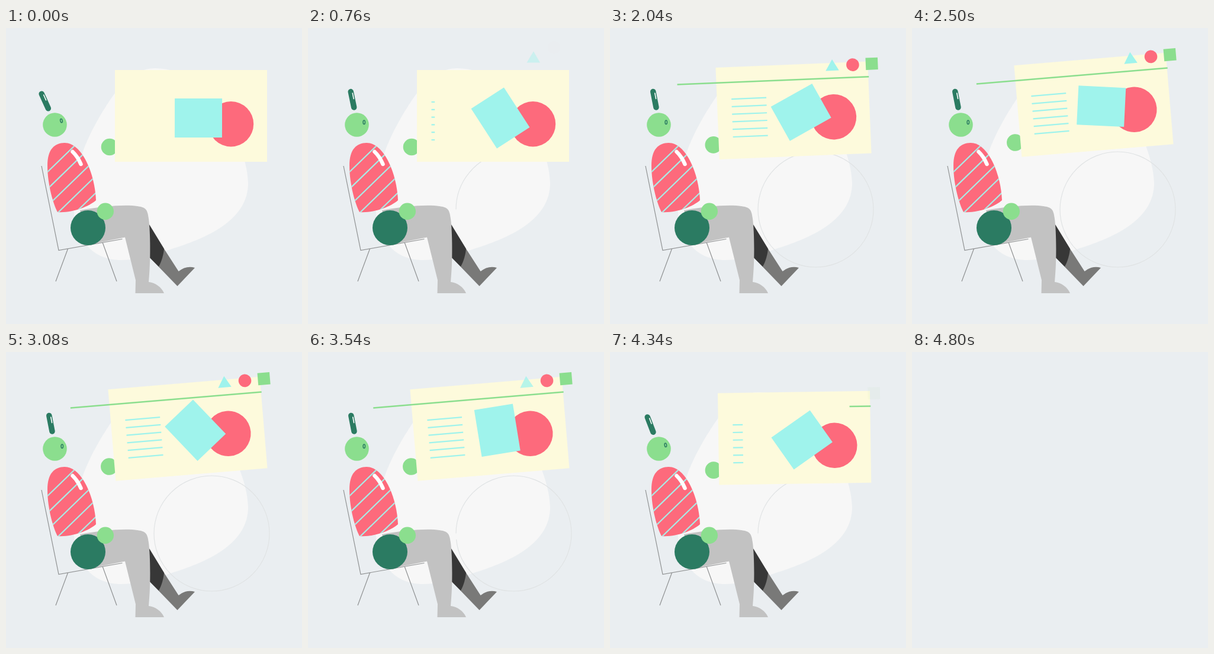
Animation of 500 by 500 pixels, one loop 4.82 s. Source, as an HTML page:

```html
<!DOCTYPE html>
<html lang="en">
<head>
<meta charset="utf-8">
<title>Presenter</title>
<style>
  html, body { margin: 0; height: 100%; overflow: hidden; background: #eaeef1; }
  svg { display: block; width: 100vw; height: 100vh; }
  .leaf { fill: #8bde8e; }
  .pine { fill: #2b7b62; }
  .rose { fill: #fd6a7c; }
  .aqua { fill: #9ff3ec; }
  .line { fill: none; stroke-linecap: butt; }
  .round { fill: none; stroke-linecap: round; }
</style>
</head>
<body>
<svg id="scene" viewBox="0 0 500 500">
  <defs>
    <clipPath id="torso">
      <path d="M87 311C80 298 70 265 70 232C70 205 82 194 99 194C128 194 150 245 152 291C140 302 110 313 87 311Z"/>
    </clipPath>
  </defs>

  <path fill="#f7f7f7" d="M252 68C205 68 178 118 158 150C136 188 112 240 114 300C116 350 140 392 195 392C240 391 262 378 290 370C345 352 409 322 409 262C409 205 350 68 252 68Z"/>
  <path id="ring" class="line" stroke="#e0e3e4" stroke-width="1.2" pathLength="1" d="M250 306.5a97.5 97.5 0 0 1 195 0a97.5 97.5 0 0 1 -195 0"/>

  <!-- legs -->
  <path fill="#797978" d="M243 334L267 373L291.5 411C300 404 310 402 319 405L289.5 436L243 388Z"/>
  <path fill="#373737" d="M242 332L267 373C266 383 263 394 258 403L242 387Z"/>
  <path fill="#c2c2c2" d="M125 308C165 300 205 298 222 301C236 303 239 306 241 322C244 345 244.500 395 241 429C252 430 263 438 267 448H218.500L219 426L201 353.500L140 366Z"/>

  <g class="line" stroke="#8f9192" stroke-width="1.2">
    <path d="M60 233L89 375.500L196.500 356.500M104.500 373L84 428M163 362L187 428"/>
  </g>
  <circle class="pine" cx="138.500" cy="337.500" r="29.500"/>
  <circle class="leaf" cx="167.800" cy="309.800" r="14.200"/>

  <!-- torso -->
  <g clip-path="url(#torso)">
    <rect class="rose" x="60" y="190" width="100" height="130"/>
    <path id="stripes" class="line" stroke="#a9ece6" stroke-width="2.200"/>
  </g>
  <path class="round" stroke="#fff" stroke-width="6.500" d="M112.500 209Q121 217 126.500 230"/>

  <!-- head -->
  <circle class="leaf" cx="82.500" cy="163.500" r="20.300"/>
  <g id="head">
    <path class="round" stroke="#2b7b62" stroke-width="9.500" d="M72.800 107.500L78 134"/>
    <path class="round" stroke="#fff" stroke-width="1.600" d="M75.800 110L77.600 119.500"/>
    <ellipse class="line" stroke="#2b7b62" stroke-width="1.500" cx="94.800" cy="159.300" rx="1.700" ry="3.200"/>
  </g>

  <!-- arm and board -->
  <g id="arm">
    <circle class="leaf" cx="175" cy="201" r="14.300"/>
    <rect fill="#fdfadc" x="184" y="71" width="257" height="155"/>
    <path id="text" class="line" stroke="#9ff3ec" stroke-width="2.200"/>
    <circle class="rose" cx="380" cy="162.200" r="38.200"/>
    <rect id="card" class="aqua" x="285" y="119" width="80" height="66"/>
    <path id="rule" class="line" stroke="#8bde8e" stroke-width="2.500"/>
    <path class="icon aqua" d="M381 65L392 84H369.500Z"/>
    <circle class="icon rose" cx="415.500" cy="75.500" r="10.800"/>
    <rect class="icon leaf" x="437.500" y="64.700" width="20.500" height="20.500"/>
  </g>
</svg>

<script>
const LOOP = 4820, BLANK_AT = 4800;
const $ = id => document.getElementById(id);
const set = (el, name, value) => el.setAttribute(name, value);
const icons = document.querySelectorAll('.icon');

// Eased 0..1 progress between two times
function ease(t, from, to) {
  const u = Math.min(1, Math.max(0, (t - from) / (to - from)));
  return u * u * (3 - 2 * u);
}
const inOut = (t, a, b, c, d) => ease(t, a, b) - ease(t, c, d);

const repeat = (n, row) => Array.from({ length: n }, (_, i) => row(i)).join('');
set($('stripes'), 'd', repeat(5, i => `M60 ${253 + 28.6 * i}l100 -97`));

function draw(t) {
  $('scene').style.visibility = t >= BLANK_AT ? 'hidden' : 'visible';

  const nod = 13.3 * (inOut(t, 0, 870, 3755, 4625) - 1);
  set($('head'), 'transform', `rotate(${nod} 82.5 163.5)`);

  const lift = -4.8 * inOut(t, 1660, 2435, 3592, 4617);
  set($('arm'), 'transform', `rotate(${lift} 86 205)`);
  set($('card'), 'transform', `rotate(${t * 0.075} 325 152)`);

  const width = 59 * inOut(t, 510, 1815, 3500, 4800);
  set($('text'), 'd', repeat(6, i => `M208.5 ${125 + 12.8 * i}h${width}`));

  const start = 118 + 324 * ease(t, 3500, 4560);
  const end = 118 + 324 * ease(t, 1200, 2000);
  set($('rule'), 'd', end > start ? `M${start} 96.8H${end}` : '');

  set($('ring'), 'stroke-dasharray', `${inOut(t, 300, 1820, 3436, 4800)} 2`);

  icons.forEach((icon, i) => {
    const delay = 185 * i;
    const drop = ease(t, 550 + delay, 1030 + delay);
    set(icon, 'opacity', drop - ease(t, 3280 + delay, 4080 + delay));
    set(icon, 'transform', `translate(0 ${43 * (drop - 1)})`);
  });
}

function tick() {
  draw(performance.now() % LOOP);
  requestAnimationFrame(tick);
}
tick();
</script>
</body>
</html>
```
